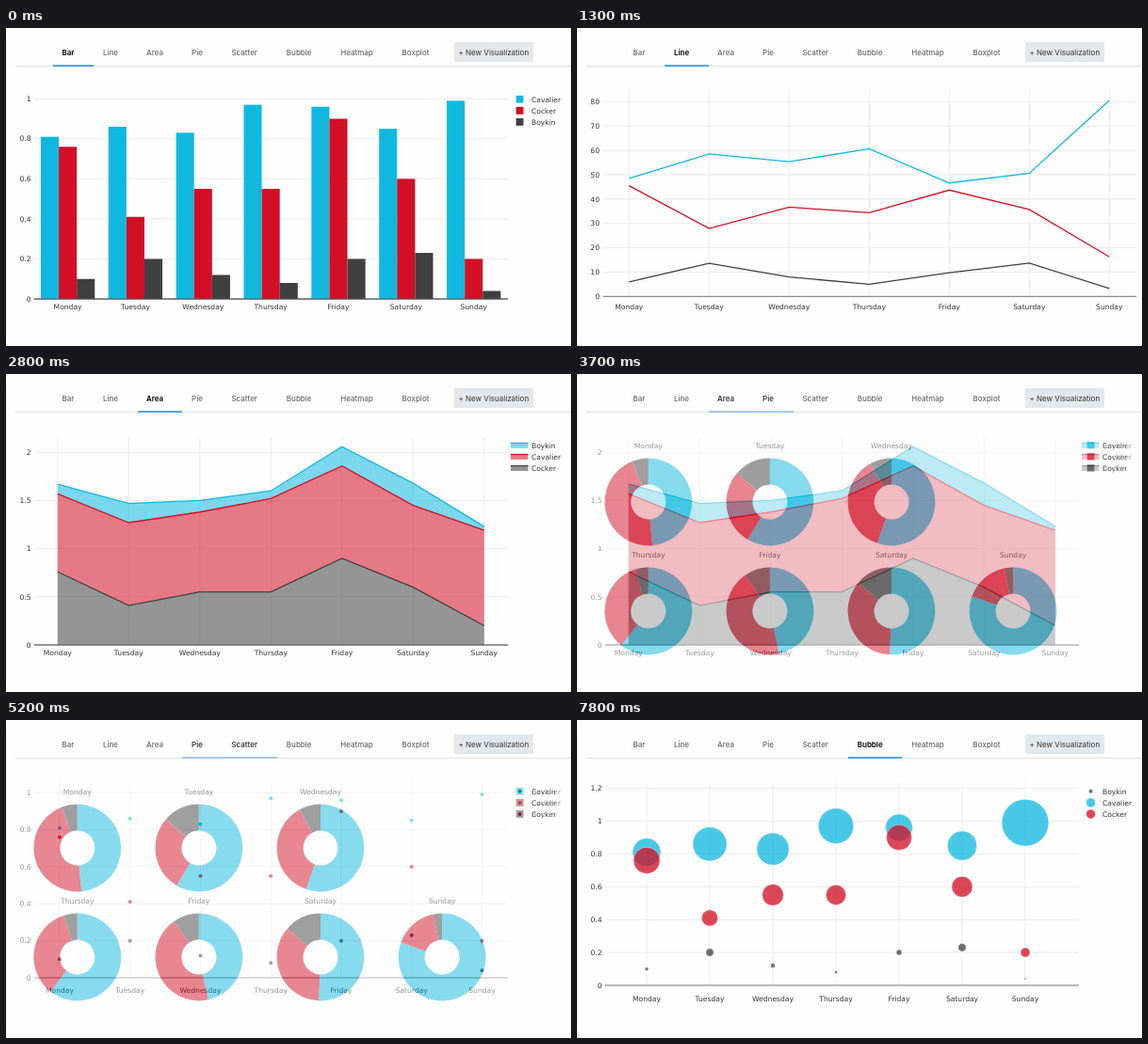
Write an HTML page that moves like this. It is 600x338 px and loops after 8 s.

```html
<!DOCTYPE html>
<html lang="en">
<head>
<meta charset="utf-8">
<title>Chart gallery</title>
<style>
  html, body { margin: 0; width: 100%; height: 100%; overflow: hidden; background: #fefefe; }
  svg { display: block; width: 600px; height: 338px; }
  text { font: 7.6px "DejaVu Sans", Verdana, sans-serif; fill: #333; }
  .tab { font: 500 8px Inter, Roboto, sans-serif; fill: #666; text-anchor: middle; }
  .on { font-weight: 600; fill: #000; }
  .mid { text-anchor: middle; }
  .end { text-anchor: end; }
</style>
</head>
<body>
<svg id="stage" viewBox="0 0 600 338"></svg>
<script>
const CYAN = '#10b8e0', RED = '#d20f25', DARK = '#404040';
const DAYS = ['Monday', 'Tuesday', 'Wednesday', 'Thursday', 'Friday', 'Saturday', 'Sunday'];
const cavalier = [.81, .86, .83, .97, .96, .85, .99];
const cocker = [.76, .41, .55, .55, .9, .6, .2];
const boykin = [.1, .2, .12, .08, .2, .23, .04];
const shares = list => list.map((v, i) => v / (cavalier[i] + cocker[i] + boykin[i]));
const SERIES = [
  { name: 'Cavalier', color: CYAN, data: cavalier },
  { name: 'Cocker', color: RED, data: cocker },
  { name: 'Boykin', color: DARK, data: boykin }
];
const BOYKIN_FIRST = [SERIES[2], SERIES[0], SERIES[1]];

const text = (x, y, str, cls = '') => `<text x="${x}" y="${y + 2.7}" class="${cls}">${str}</text>`;
const rect = (x, y, w, h, fill) => `<rect x="${x}" y="${y}" width="${w}" height="${h}" fill="${fill}"/>`;
const line = (x1, y1, x2, y2, stroke, w = 1) =>
  `<path d="M${x1} ${y1}L${x2} ${y2}" stroke="${stroke}" stroke-width="${w}"/>`;
const dot = (x, y, r, fill, extra = '') => `<circle cx="${x}" cy="${y}" r="${r}" fill="${fill}" ${extra}/>`;
const curve = (pts, color) =>
  `<polyline points="${pts.join(' ')}" fill="none" stroke="${color}" stroke-width="1.3"/>`;
const days = fn => DAYS.map((day, i) => fn(i, day)).join('');

// Grid, axis and labels; a = { x0, dx, y0, unit, step, max, left, right, labelY, upright }
function axes(a) {
  let s = '';
  for (let k = 0; k * a.step <= a.max + 1e-6; k++) {
    const v = +(k * a.step).toFixed(1), y = a.y0 - v * a.unit;
    if (k) s += line(a.left, y, a.right, y, '#ededed');
    s += text(a.left - 3.5, y, v, 'end');
  }
  s += days((i, day) => {
    const x = a.x0 + i * a.dx;
    return (a.upright ? line(x, 67, x, a.y0, '#ededed') : '') + text(x, a.labelY, day, 'mid');
  });
  return s + line(a.left, a.y0, a.right, a.y0, '#707070');
}

const legend = (names, icon) => names.map((name, i) => {
  const y = 75.8 + i * 12.1;
  return icon(i, y) + text(558, y, name);
}).join('');
const squares = () => legend(SERIES.map(s => s.name),
  (i, y) => rect(541.7, y - 4, 7.8, 7.8, SERIES[i].color));

function bar() {
  const a = { x0: 65.6, dx: 71.85, y0: 288, unit: 212.8, step: .2, max: 1, left: 30, right: 533, labelY: 296 };
  return axes(a) + SERIES.map((s, k) => days(i => {
    const h = s.data[i] * a.unit;
    return rect(a.x0 + i * a.dx + (k - 1.5) * 19.1, a.y0 - h, 19.1, h, s.color);
  })).join('') + line(a.left, a.y0, a.right, a.y0, '#555') + squares();
}

function lines() {
  const a = { x0: 55.3, dx: 85, y0: 285.3, unit: 2.587, step: 10, max: 80, left: 27.5, right: 594, labelY: 296, upright: true };
  return axes(a) + SERIES.map(s => curve(
    shares(s.data).map((v, i) => [a.x0 + i * a.dx, a.y0 - v * 100 * a.unit]), s.color)).join('');
}

function area() {
  const a = { x0: 54.8, dx: 75.5, y0: 288, unit: 102.35, step: .5, max: 2, left: 30, right: 533, labelY: 296, upright: true };
  const layers = [[cocker, DARK], [cavalier, RED], [boykin, CYAN]];
  let base = DAYS.map((d, i) => [a.x0 + i * a.dx, a.y0]), fills = '', tops = '';
  for (const [data, color] of layers) {
    const top = base.map(([x, y], i) => [x, y - data[i] * a.unit]);
    fills += `<polygon points="${[...top, ...base.reverse()].join(' ')}" fill="${color}" fill-opacity=".55"/>`;
    tops += curve(top, color);
    base = top;
  }
  return axes(a) + fills + tops + line(a.left, a.y0, a.right, a.y0, '#707070') +
    legend(['Boykin', 'Cavalier', 'Cocker'], (i, y) => {
      const color = [CYAN, RED, DARK][i];
      return `<g fill-opacity=".55">${rect(536, y - 2.4, 18.5, 5.4, color)}</g>` +
        line(536, y - 2.4, 554.5, y - 2.4, color, 1.3);
    });
}

function pie() {
  const R = 46.4, r = 18.5;
  return days((i, day) => {
    const cx = 75.8 + (i < 3 ? i : i - 3) * 129.1, cy = i < 3 ? 136 : 252;
    const at = (rad, turn) => {
      const t = turn * 2 * Math.PI;
      return `${cx + rad * Math.sin(t)} ${cy - rad * Math.cos(t)}`;
    };
    let from = 0;
    const slices = SERIES.map(s => {
      const share = shares(s.data)[i], to = from + share, big = +(share > .5);
      const d = `M${at(R, from)}A${R} ${R} 0 ${big} 1 ${at(R, to)}L${at(r, to)}A${r} ${r} 0 ${big} 0 ${at(r, from)}Z`;
      from = to;
      return `<path d="${d}" fill="${s.color}"/>`;
    }).join('');
    return slices + text(cx, cy - 60, day, 'mid');
  }) + squares();
}

function scatter() {
  const a = { x0: 57, dx: 74.75, y0: 274, unit: 196.7, step: .2, max: 1, left: 30, right: 533, labelY: 287.3, upright: true };
  return axes(a) + BOYKIN_FIRST.map(s => days(i =>
    dot(a.x0 + i * a.dx, a.y0 - s.data[i] * a.unit, 2, s.color))).join('') +
    legend(BOYKIN_FIRST.map(s => s.name), (i, y) => dot(545.6, y, 2, BOYKIN_FIRST[i].color));
}

function bubble() {
  const a = { x0: 74, dx: 67, y0: 282, unit: 174.6, step: .2, max: 1.2, left: 30, right: 533, labelY: 296, upright: true };
  const look = 'opacity=".76" stroke="#fff" stroke-width=".5"';
  return axes(a) + BOYKIN_FIRST.map(s => days(i =>
    dot(a.x0 + i * a.dx, a.y0 - s.data[i] * a.unit, shares(s.data)[i] * 31, s.color, look))).join('') +
    legend(BOYKIN_FIRST.map(s => s.name), (i, y) => dot(545.6, y, i ? 5 : 2.2, BOYKIN_FIRST[i].color, look));
}

const TABS = ['Bar', 'Line', 'Area', 'Pie', 'Scatter', 'Bubble', 'Heatmap', 'Boxplot'];
const TAB_X = [66, 111, 158, 203, 253.2, 311.2, 372.5, 435];
const EDGES = [50, 93, 140, 187, 230, 288, 345];

const header = active => rect(0, 0, 600, 338, '#fefefe') + line(.5, 12, .5, 328, '#f6f6f6') +
  line(10, 40.5, 600, 40.5, '#e2e2e2') +
  TABS.map((name, i) => text(TAB_X[i], 26, name, i === active ? 'tab on' : 'tab')).join('') +
  rect(476, 15, 84, 21, '#e3e8ec') +
  `<text x="517.8" y="28.7" class="tab" style="fill:#333;font-weight:400">+ New Visualization</text>` +
  rect(EDGES[active], 39.3, EDGES[active + 1] - EDGES[active], 1.6, '#2f8de4');

const stage = document.getElementById('stage');
stage.innerHTML = [bar, lines, area, pie, scatter, bubble]
  .map((draw, i) => `<g>${header(i)}${draw()}</g>`).join('');
const scenes = [...stage.children];

// Each scene fades in over the one before it, in steps of 100 ms.
const STARTS = [-1000, 400, 2000, 3500, 5000, 6500], FADE = 900;
const begin = performance.now();

function frame(now) {
  const t = Math.floor(Math.max(0, now - begin) % 8000 / 100) * 100;
  scenes.forEach((scene, i) => {
    const u = Math.min(1, Math.max(0, (t - STARTS[i] + 100) / FADE));
    const p = t < STARTS[i] ? 0 : Math.sin(u * Math.PI / 2);
    scene.setAttribute('opacity', p);
    scene.style.display = p ? '' : 'none';
  });
  requestAnimationFrame(frame);
}
frame(begin);
</script>
</body>
</html>
```
